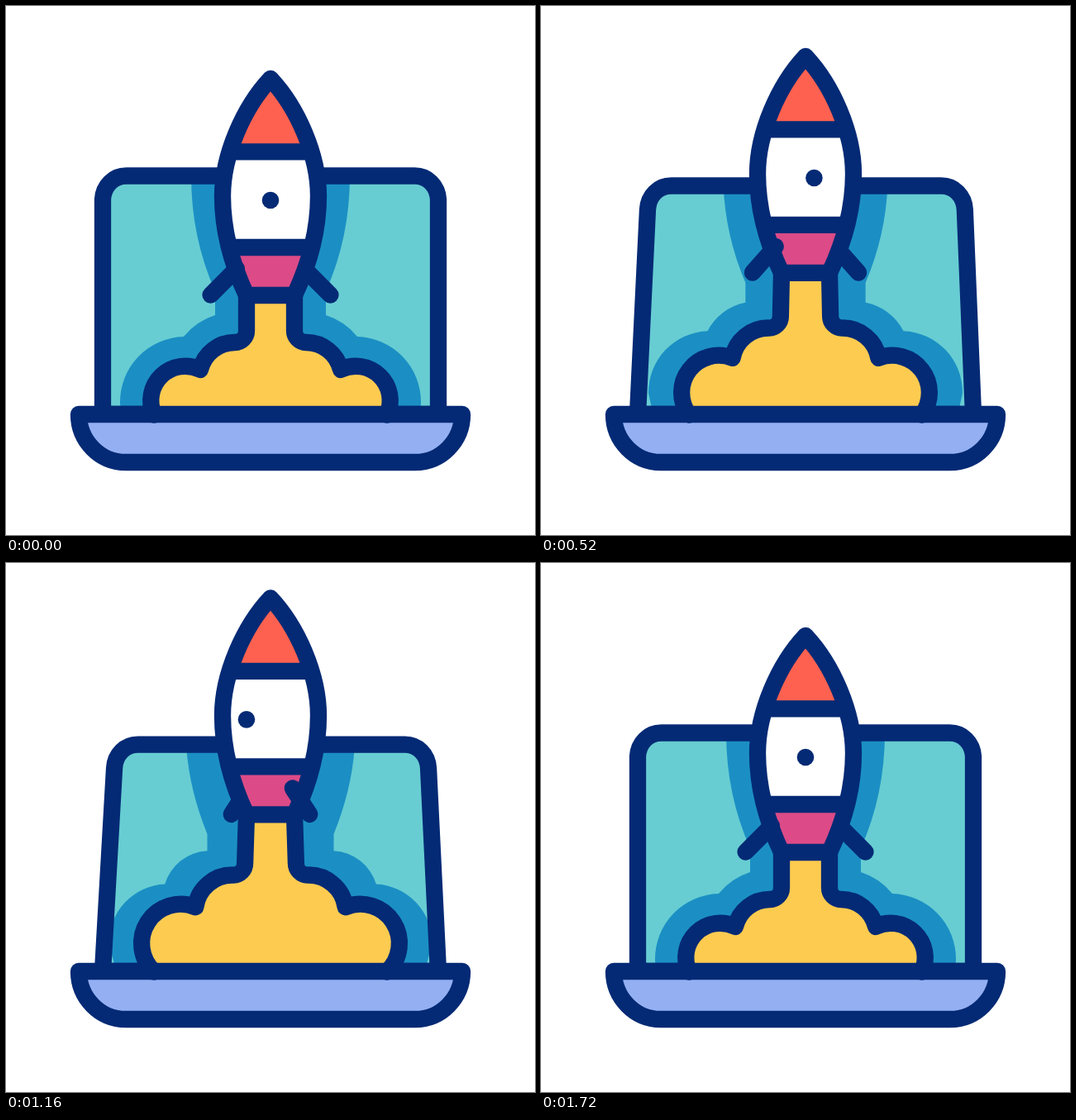
Write an HTML page with a canvas that moves like this. It is 640 by 640 pixels and loops after 2 s.

```html
<!DOCTYPE html>
<html lang="en">
<head>
<meta charset="utf-8">
<title>Rocket launch</title>
<style>
  html, body { margin: 0; height: 100%; overflow: hidden; background: #fff; }
  canvas { display: block; width: 640px; height: 640px; }
</style>
</head>
<body>
<canvas id="stage" width="640" height="640"></canvas>
<script>
const ctx = document.getElementById('stage').getContext('2d');
const LOOP = 2000, STEP = 40;
const NAVY = '#042a75', TEAL = '#67cdd2', BLUE = '#1b8fc4', LILAC = '#94b0f3',
      RED = '#ff6150', PINK = '#dc4b87', YELLOW = '#fdcb50';

// Symmetric cubic ease through (a, 0) and (1 - a, 1).
function ease(x, a) {
  if (x <= 0) return 0;
  if (x >= 1) return 1;
  let lo = 0, hi = 1, s;
  for (let i = 0; i < 24; i++) {
    s = (lo + hi) / 2;
    const r = 1 - s;
    if (3 * r * r * s * a + 3 * r * s * s * (1 - a) + s * s * s < x) lo = s; else hi = s;
  }
  return s * s * (3 - 2 * s);
}
const ramp = (t, from, to, a) => ease((t - from) / (to - from), a);

function fill(path, color) {
  ctx.fillStyle = color;
  ctx.fill(path);
}

function stroke(path) {
  ctx.strokeStyle = NAVY;
  ctx.stroke(path);
}

function clipped(path, draw) {
  ctx.save();
  ctx.clip(path);
  draw();
  ctx.restore();
}

// Draws the left half, then its reflection about the centre line.
function mirrored(draw) {
  draw();
  ctx.save();
  ctx.translate(640, 0);
  ctx.scale(-1, 1);
  draw();
  ctx.restore();
}

const base = new Path2D('M88 494H552A57 58 0 0 1 495 552H145A57 58 0 0 1 88 494Z');
const body = new Path2D(`M320 88C288 122 262 180 262 230C262 275 274 314 291 350
  H349C366 314 378 275 378 230C378 180 352 122 320 88Z`);
const bands = new Path2D('M270 176.4H370M270 292H370');

function screenPath(d) {
  const left = 117 + d, right = 523 - 0.85 * d, top = 205.5 + d;
  return new Path2D(`M117 494L${left} ${top + 28.5}
    C${left + 1} ${top + 12} ${left + 13} ${top} ${left + 28.5} ${top}
    H${right - 28.5}C${right - 13} ${top} ${right - 1} ${top + 12} ${right} ${top + 28.5}L523 494Z`);
}

function haloPath(q) {
  const neck = 253 - 10 * q, r1 = 80 - 25 * q, r2 = 79 - 9 * q;
  return new Path2D(`M321 180H${224 - 6 * q}V${205 + 20 * q}
    Q${224 - 2 * q} ${280 - 5 * q} ${neck} ${345 - 18 * q}V${374 - 27 * q}
    A${r1} ${r1} 0 0 0 ${215 - 24 * q} ${400 - 12 * q}
    A${r2} ${r2} 0 0 0 ${138 - 14 * q} ${480 - 20 * q}
    L${139 - 6 * q} 494H321Z`);
}

function drawSmoke(q) {
  const top = 350 - 48 * q, r1 = 43 + 2 * q, r2 = 41.5 + 6.1 * q;
  const edge = `M291 ${top}L${291 - 2 * q} ${393 - 31 * q}
    A14 14 0 0 1 ${277 - 2 * q} ${407 - 31 * q}
    A${r1} ${r1} 0 0 0 ${235 - 6 * q} ${440 - 25 * q}
    A${r2} ${r2} 0 0 0 179 494.5`;
  mirrored(() => fill(new Path2D(`${edge}H321V${top}Z`), YELLOW));
  mirrored(() => stroke(new Path2D(edge)));
}

// Fin at turn p: 0 is the left side, 1 the right side.
function drawFin(p, lift) {
  stroke(new Path2D(`M${279 + 82 * p} ${318 - lift}L${247.5 + 145 * p} ${349.6 - lift}`));
}

function drawBody(p, lift) {
  ctx.save();
  ctx.translate(0, -lift);
  clipped(body, () => {
    [[RED, 80, 96], ['#fff', 176, 116], [PINK, 292, 60]].forEach(([color, y, h]) => {
      ctx.fillStyle = color;
      ctx.fillRect(250, y, 140, h);
    });
    // The porthole leaves on the right and comes back on the left.
    const n = p < 0.5 ? p : 1 - p;
    const offset = (185 * n - 102 * n * n) * (p < 0.5 ? 1 : -1);
    const porthole = new Path2D();
    porthole.arc(320 + offset, 235, 10.3, 0, 2 * Math.PI);
    fill(porthole, NAVY);
    stroke(bands);
  });
  stroke(body);
  ctx.restore();
}

function draw(t) {
  const rise = ramp(t, 40, 970, 0.75) - ramp(t, 969, 1759, 0.75);
  const tilt = 18 * (ramp(t, 83, 843, 0.57) - ramp(t, 840, 1740, 0.55));
  const turn = ramp(t, 120, 1760, 0.7);
  const lift = 48 * rise;
  const screen = screenPath(tilt);

  ctx.fillStyle = '#fff';
  ctx.fillRect(0, 0, 640, 640);
  ctx.lineWidth = 20.3;
  ctx.lineCap = ctx.lineJoin = 'round';

  fill(screen, TEAL);
  clipped(screen, () => mirrored(() => fill(haloPath(rise), BLUE)));
  stroke(screen);
  drawFin(1 - turn, lift);
  fill(base, LILAC);
  drawSmoke(rise);
  stroke(base);
  drawBody(turn, lift);
  drawFin(turn, lift);
}

function frame() {
  const t = Math.floor(performance.now() % LOOP / STEP) * STEP;
  draw(t < 120 || t >= 1720 ? 0 : t);
  requestAnimationFrame(frame);
}
frame();
</script>
</body>
</html>
```
